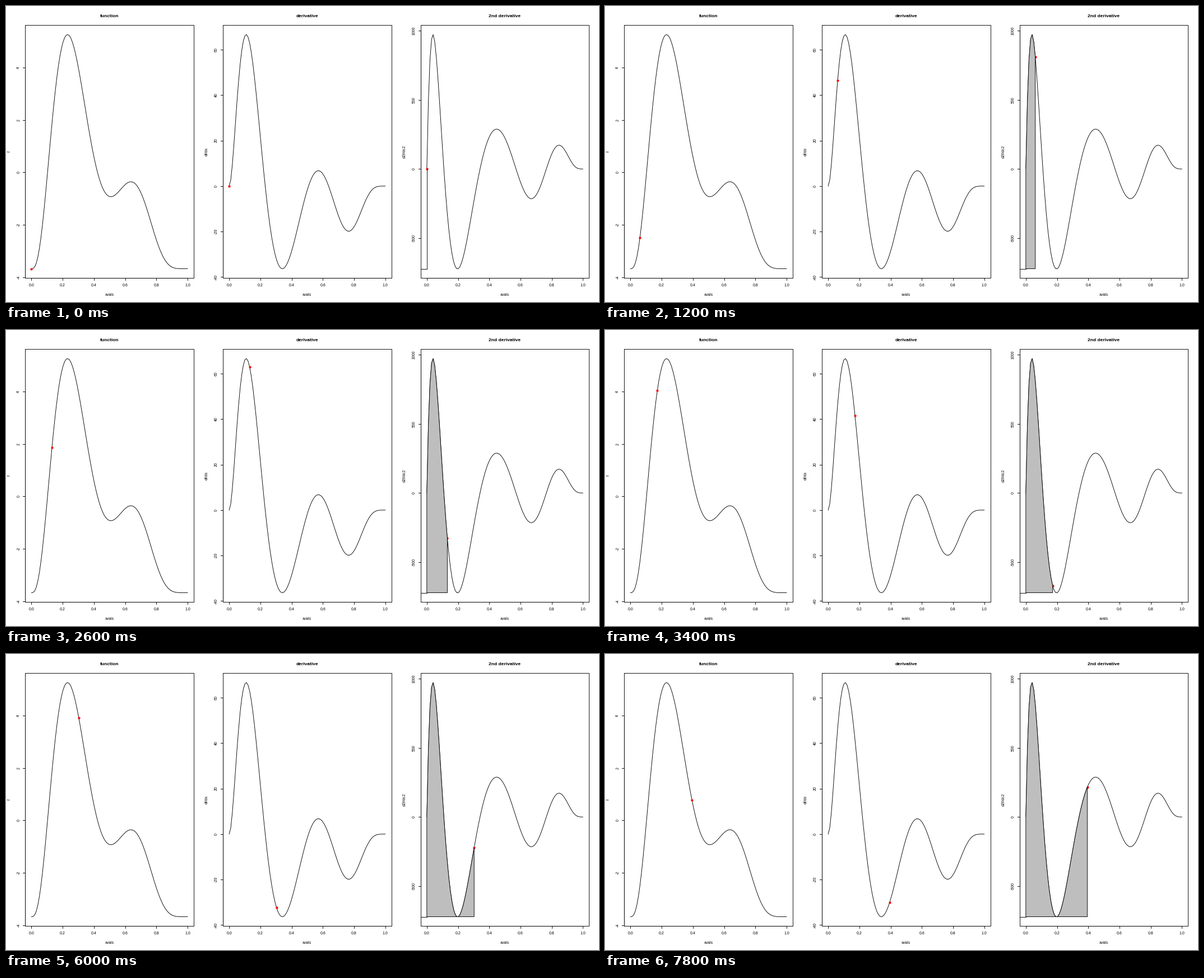
Recreate the animation shown at these times as a matplotlib script. Size 1058x529 px, loop 8 s.

```python
import numpy as np
import matplotlib.pyplot as plt
from matplotlib.animation import FuncAnimation
from matplotlib.patches import Polygon as Patch
from numpy.polynomial import Polynomial

W, H, DPI = 1058, 529, 64
PT = 72 / DPI              # points per pixel
LINE = 8.38                # one margin line in pixels
LW = 0.9 * PT
TOP, BOTTOM = 4.1 * LINE, H - 5.1 * LINE
FRAMES, INTERVAL = 40, 200

plt.rcParams["font.family"] = "Liberation Sans"


def bump(p, q, scale):
    return scale * Polynomial([0, 1]) ** p * Polynomial([1, -1]) ** q


# Two weighted beta densities, shifted down
func = bump(3, 10, 2.5 * 4004) + bump(11, 6, 0.9 * 222768) - 3.675
xs = np.linspace(0, 1, 100)

fig = plt.figure(figsize=(W / DPI, H / DPI), dpi=DPI, facecolor="white")
ax = fig.add_axes([0, 0, 1, 1])
ax.set_xlim(0, W)
ax.set_ylim(H, 0)
ax.axis("off")


def stroke(x, y, **kw):
    return ax.plot(x, y, color="black", lw=LW, **kw)[0]


def label(x, y, s, size=7, **kw):
    ax.text(x, y, s, fontsize=size * PT, ha="center", va="baseline",
            rotation_mode="anchor", **kw)


class Panel:
    def __init__(self, index, title, ylabel, values, ticks):
        self.left = index * W / 3 + 4.1 * LINE
        self.right = (index + 1) * W / 3 - 2.1 * LINE
        self.low, self.high = values.min(), values.max()
        self.x, self.y = self.px(xs), self.py(values)
        stroke(self.x, self.y, solid_joinstyle="round", zorder=2)
        self.draw_frame(title, ylabel, ticks)
        self.dot = ax.plot([], [], "o", color="red", ms=4.2 * PT, mew=0, zorder=3)[0]

    def px(self, x):
        return self.left + (self.right - self.left) * (x + 0.04) / 1.08

    def py(self, y):
        part = (y - self.low) / (self.high - self.low)
        return BOTTOM - (BOTTOM - TOP) * (part + 0.04) / 1.08

    def draw_frame(self, title, ylabel, ticks):
        l, r = self.left, self.right
        mid = (l + r) / 2
        stroke([l, r, r, l, l], [TOP, TOP, BOTTOM, BOTTOM, TOP], zorder=5)
        label(mid, TOP / 2 + 3, title, 8.4, weight="bold")
        label(mid, BOTTOM + 3.8 * LINE, "xvals")
        label(l - 3.2 * LINE, (TOP + BOTTOM) / 2, ylabel, rotation=90)

        stroke(self.px(np.array([0, 1])), [BOTTOM] * 2, zorder=5)
        for v in np.arange(6) / 5:
            x = self.px(v)
            stroke([x, x], [BOTTOM, BOTTOM + LINE / 2], zorder=5)
            label(x, BOTTOM + 1.8 * LINE, f"{v:.1f}")

        stroke([l, l], [self.py(ticks[0]), self.py(ticks[-1])], zorder=5)
        for v in ticks:
            y = self.py(v)
            stroke([l - LINE / 2, l], [y, y], zorder=5)
            label(l - 1.2 * LINE, y, str(v), rotation=90)

    def move_dot(self, k):
        self.dot.set_data([self.x[k]], [self.y[k]])


panels = [
    Panel(0, "function", "f", func(xs), range(-4, 5, 2)),
    Panel(1, "derivative", "df/dx", func.deriv()(xs), range(-40, 61, 20)),
    Panel(2, "2nd derivative", "d2f/dc2", func.deriv(2)(xs), range(-500, 1001, 500)),
]

# Shaded area under the second derivative, with its base line to the box
last = panels[2]
base = last.py(last.low)
stroke([last.left, last.x[0]], [base, base], zorder=4)
area = Patch([[0, 0]], closed=True, facecolor="#bebebe", edgecolor="black",
             lw=LW, joinstyle="round", zorder=4)
ax.add_patch(area)


def update(k):
    for panel in panels:
        panel.move_dot(k)
    x, y = last.x[:k + 1], last.y[:k + 1]
    area.set_xy(np.column_stack([np.r_[x[0], x, x[-1]], np.r_[base, y, base]]))
    return [area] + [panel.dot for panel in panels]


anim = FuncAnimation(fig, update, frames=FRAMES, interval=INTERVAL,
                     init_func=lambda: update(0), repeat=True, repeat_delay=0)
plt.show()
```
